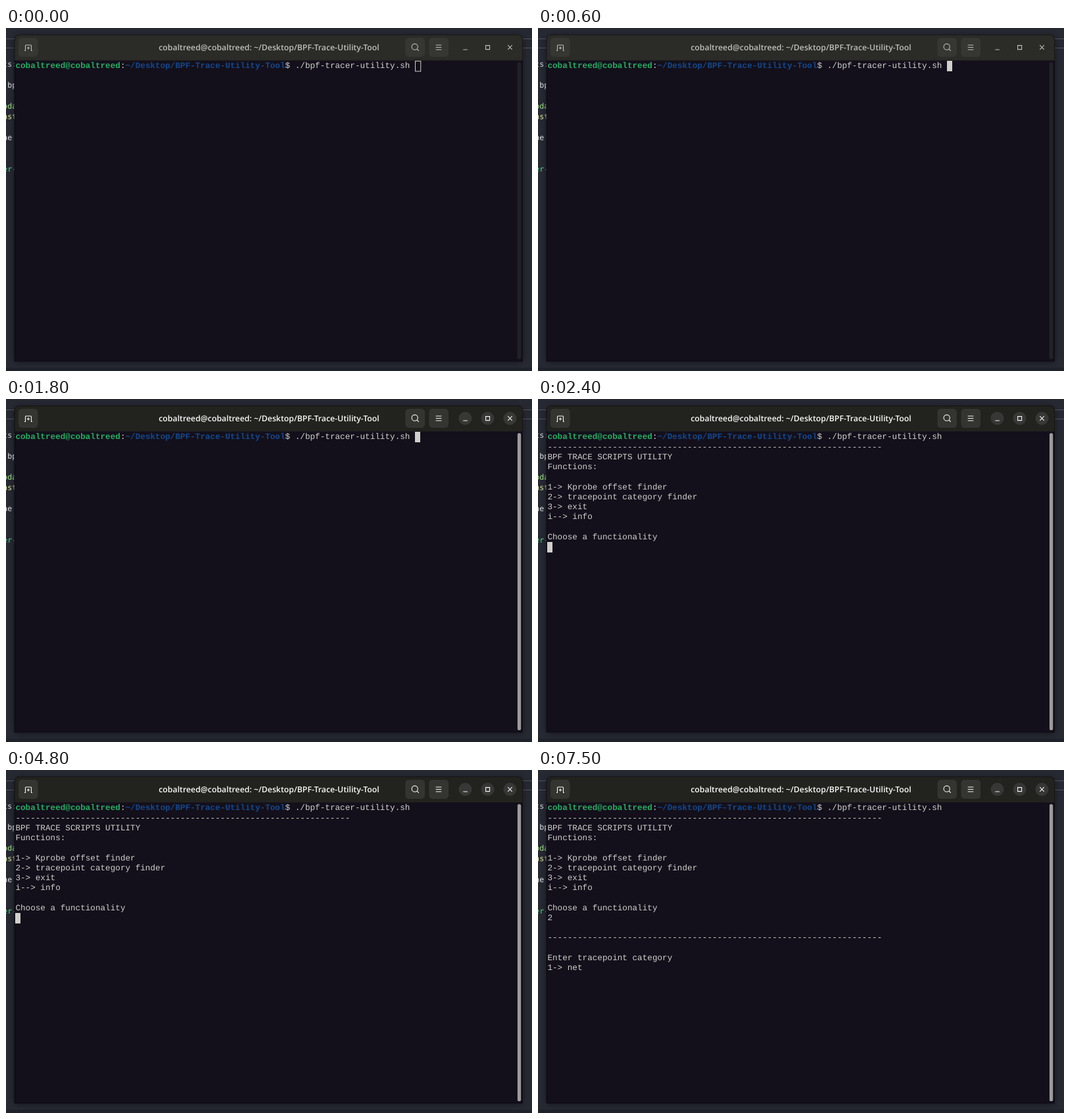
Recreate the animation shown at these times as an HTML page. Size 800x523 px, loop 8 s.

```html
<!DOCTYPE html>
<html lang="en">
<head>
<meta charset="utf-8">
<title>Terminal</title>
<style>
  html, body { margin: 0; width: 100%; height: 100%; overflow: hidden; background: #262832; }
  svg { display: block; width: 100vw; height: 100vh; }
  text { white-space: pre; text-rendering: geometricPrecision; }
  .term { font: 12.667px "Liberation Mono", monospace; fill: #d0cfcc; }
  .term .user { font-weight: 700; fill: #2aab62; }
  .term .path { font-weight: 700; fill: #15478a; }
  .back { font: 11.6px "DejaVu Sans Mono", monospace; }
  .title { font: 600 12.3px "Open Sans", "Noto Sans", sans-serif; text-anchor: middle; }
  .icon { fill: none; stroke-width: 1.1; }
</style>
</head>
<body>
<svg viewBox="0 0 800 523" preserveAspectRatio="none">
  <defs>
    <filter id="blur" x="-10%" y="-10%" width="120%" height="120%"><feGaussianBlur stdDeviation="4"/></filter>
  </defs>
  <rect width="800" height="523" fill="#262832"/>
  <path d="M0 16.5H800M0 30.5H800" stroke="#50525c"/>
  <rect y="518" width="800" height="5" fill="#20222b"/>
  <g class="back" id="back"></g>
  <rect x="13" y="12" width="773" height="498" rx="8" fill="#000" opacity=".4" filter="url(#blur)"/>

  <path d="M12.6 508.5V18a8 8 0 0 1 8-8H778a8 8 0 0 1 8 8V508.5Z" fill="#13101b"/>
  <path id="header" d="M12.6 49.5V18a8 8 0 0 1 8-8H778a8 8 0 0 1 8 8V49.5Z"/>
  <path d="M13.1 508V18a7.5 7.5 0 0 1 7.5-7.5H778a7.5 7.5 0 0 1 7.5 7.5V508Z" fill="none" stroke="#0b0a10" stroke-opacity=".55"/>
  <g id="buttons">
    <rect x="19" y="15" width="29.5" height="29" rx="5"/>
    <rect x="607.5" y="15" width="29.5" height="29" rx="5"/>
    <rect x="643.5" y="15" width="29.5" height="29" rx="5"/>
  </g>
  <g id="circles" fill="#373735">
    <circle cx="698.5" cy="29.5" r="10"/>
    <circle cx="732.5" cy="29.5" r="10"/>
    <circle cx="766.5" cy="29.5" r="10"/>
  </g>
  <g class="icon" id="icons">
    <path d="M28 34.5h1.5v-7.5q0-1 1-1h7q1 0 1 1v7.5h1.5M34 28.3v4.4M31.8 30.5h4.4"/>
    <path d="M626.3 28.7a4.6 4.6 0 1 1-9.2 0a4.6 4.6 0 1 1 9.2 0M625 32l2.8 2.8"/>
    <path d="M653.7 26h8.6M653.7 29.5h8.6M653.7 33h8.6"/>
    <path d="M695.3 33h6.6M729.6 26.6h6v6h-6ZM763.2 26.2l6.6 6.6M769.8 26.2l-6.6 6.6"/>
  </g>
  <text class="title" id="title" x="400" y="33.8"></text>

  <rect x="777.5" y="52" width="6" height="453" rx="3" fill="#211f28"/>
  <rect id="thumb" x="778" y="52" width="5.2" height="453" rx="2.6" fill="#9c9b9b"/>
  <g class="term" id="screen"></g>
  <rect id="cursor" x="0" y="0"/>
</svg>
<script>
const NS = "http://www.w3.org/2000/svg";
const $ = id => document.getElementById(id);
const LOOP = 8000, FOCUS = 600, MENU = 2400, KEY = 6000, ENTER = 6900, BLINK = 600;
const LEFT = 14.4, COL = 7.6, ROW = 15.24, BASE = 61.32;

const user = "cobaltreed@cobaltreed";
const path = "~/Desktop/BPF-Trace-Utility-Tool";
const rule = "-".repeat(67);

function addText(parent, x, y, text, fill) {
  const el = document.createElementNS(NS, "text");
  el.setAttribute("x", x);
  el.setAttribute("y", y);
  if (fill) el.setAttribute("fill", fill);
  el.textContent = text;
  parent.append(el);
  return el;
}

function addSpan(parent, text, cls) {
  const el = document.createElementNS(NS, "tspan");
  if (cls) el.setAttribute("class", cls);
  el.textContent = text;
  parent.append(el);
}

// Page behind the window, only its edge shows.
[
  [59, "ts:", "#d5d8dc"],
  [91, " bp", "#e4e6ea"],
  [123, "pda", "#a4e48c"],
  [139, "nst", "#dfeba6"],
  [171, "he", "#e4e6ea"],
  [219, "er-", "#55d68a"]
].forEach(([y, text, fill]) => addText($("back"), -4.8, y, text, fill));

$("title").textContent = `${user}: ${path}`;

const prompt = addText($("screen"), LEFT, BASE, "");
addSpan(prompt, user, "user");
addSpan(prompt, ":");
addSpan(prompt, path, "path");
addSpan(prompt, "$ ./bpf-tracer-utility.sh");

// Lines of output: first row, start time, text.
const lines = [];
function print(row, start, texts) {
  texts.forEach((text, i) => {
    if (text) lines.push({ start, el: addText($("screen"), LEFT, BASE + (row + i) * ROW, text) });
  });
}
print(1, MENU, [
  rule, "BPF TRACE SCRIPTS UTILITY", "Functions:", "",
  "1-> Kprobe offset finder", "2-> tracepoint category finder", "3-> exit", "i--> info", "",
  "Choose a functionality"
]);
print(11, KEY, ["2"]);
print(13, ENTER, [rule, "", "Enter tracepoint category", "1-> net"]);

function mix(a, b, k) {
  return `rgb(${a.map((v, i) => Math.round(v + (b[i] - v) * k)).join()})`;
}

function drawCursor(t) {
  const [col, row] = t < MENU ? [80, 0] : t < KEY ? [0, 11] : t < ENTER ? [1, 11] : [0, 17];
  const focused = t >= FOCUS;
  // Output and typing restart the blink.
  const restart = [ENTER, KEY, MENU, FOCUS].find(time => t >= time);
  const on = !focused || Math.floor((t - restart) / BLINK) % 2 === 0;
  const inset = focused ? 0 : 0.5;
  const attrs = {
    x: Math.round(LEFT + col * COL) + inset,
    y: Math.round(50.3 + row * ROW) + inset,
    width: 8 + inset / 2,
    height: 16 - inset,
    fill: focused ? "#d0cfcc" : "none",
    stroke: focused ? "none" : "#d0cfcc",
    visibility: on ? "visible" : "hidden"
  };
  for (const name in attrs) $("cursor").setAttribute(name, attrs[name]);
}

function draw(t) {
  const p = Math.min(1, Math.max(0, (t - FOCUS) / 300));
  const k = 1 - (1 - p) ** 2;
  $("header").setAttribute("fill", mix([43, 43, 39], [34, 34, 31], k));
  $("buttons").setAttribute("fill", mix([54, 54, 50], [52, 52, 49], k));
  $("icons").setAttribute("stroke", mix([190, 190, 186], [246, 246, 244], k));
  $("title").setAttribute("fill", mix([190, 190, 186], [250, 250, 248], k));
  $("circles").setAttribute("opacity", k);
  $("thumb").setAttribute("opacity", k);
  for (const { start, el } of lines) el.setAttribute("visibility", t >= start ? "visible" : "hidden");
  drawCursor(t);
}

const begin = performance.now();
function tick() {
  draw((performance.now() - begin) % LOOP);
  requestAnimationFrame(tick);
}
draw(0);
requestAnimationFrame(tick);
</script>
</body>
</html>
```
